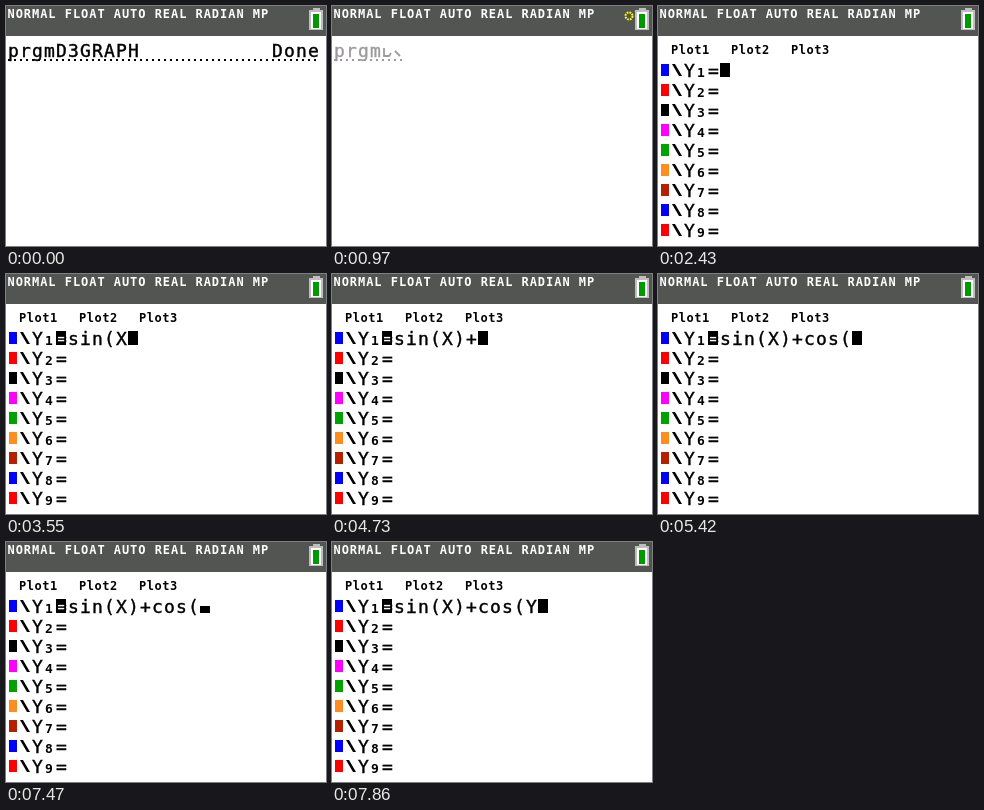
An HTML page that plays this animation: 320 px wide and 240 px high, repeating every 8000 ms.

```html
<!DOCTYPE html>
<html lang="en">
<head>
<meta charset="utf-8">
<title>Entering a function</title>
<style>
  html, body { margin: 0; width: 100%; height: 100%; overflow: hidden; background: #fff; }
  svg { display: block; width: 320px; height: 240px; color: #000; }
  text { font-family: "DejaVu Sans Mono", monospace; fill: currentColor; }
  .big { font-size: 18px; letter-spacing: 1.163px; stroke: currentColor; stroke-width: .4px; }
  .small { font-size: 12px; font-weight: bold; letter-spacing: .95px; }
  .plot { letter-spacing: .5px; }
  .index { font-size: 13px; }
</style>
</head>
<body>
<svg viewBox="0 0 320 240" xmlns="http://www.w3.org/2000/svg">
  <rect width="320" height="240" fill="#fff"/>
  <rect width="320" height="30" fill="#525552"/>
  <text class="small" x="1.5" y="11.5" color="#fff">NORMAL FLOAT AUTO REAL RADIAN MP</text>
  <circle id="busy" cx="297" cy="10" r="3.5" fill="none" stroke="#ffff00" stroke-width="2" stroke-dasharray="1.75 1"/>
  <path d="M307 2h7v2h3v20h-14v-20h4z" fill="#bdbebd"/>
  <rect x="305" y="6" width="10" height="17" fill="#fff"/>
  <rect x="307" y="8" width="6" height="14" fill="#009a00"/>
  <g id="home">
    <text class="big" id="entry" x="2" y="51"></text>
    <text class="big" id="answer" x="266" y="51">Done</text>
    <path id="partial" d="M52 42V50H57L59 47M63 45L68 50" fill="none" stroke="currentColor" stroke-width="1.8"/>
    <line id="dots" x1="2" y1="54" y2="54" stroke="currentColor" stroke-width="2" stroke-dasharray="2 4"/>
  </g>
  <g id="editor">
    <g id="plots"></g>
    <g id="rows"></g>
    <g id="equal">
      <rect x="50" y="57" width="10" height="14"/>
      <text class="small" x="51.4" y="68.5" color="#fff">=</text>
    </g>
    <text class="big" id="formula" x="62" y="71"></text>
  </g>
  <rect id="cursor" width="10" height="14"/>
  <text class="big" id="alpha" y="71" color="#fff">A</text>
</svg>
<script>
const LOOP = 8000;
const el = id => document.getElementById(id);
const show = (id, on) => el(id).setAttribute("display", on ? "inline" : "none");
const colX = col => 2 + 12 * col;

function add(parent, tag, attrs, text = "") {
  const node = document.createElementNS("http://www.w3.org/2000/svg", tag);
  for (const key in attrs) node.setAttribute(key, attrs[key]);
  node.textContent = text;
  parent.appendChild(node);
  return node;
}

[1, 2, 3].forEach(n =>
  add(el("plots"), "text", { class: "small plot", x: 60 * n - 47, y: 47.5 }, "Plot" + n));

const colors = ["#0000ff", "#ff0000", "#000", "#ff00ff", "#00a200", "#ff8e21", "#b52000", "#0000ff", "#ff0000"];
const rows = colors.map((color, i) => {
  const g = add(el("rows"), "g", { transform: `translate(0 ${57 + 20 * i})` });
  add(g, "rect", { x: 3, y: 1, width: 8, height: 12, fill: color });
  add(g, "path", { d: "M14 1h3l7 12h-3z" });
  add(g, "text", { class: "big", x: 26, y: 14 }, "Y");
  add(g, "text", { class: "small index", x: 39, y: 14 }, i + 1);
  add(g, "text", { class: "big", x: 50, y: 14 }, "=");
  return g;
});

// Each track lists [start time, value]
const at = (track, t) => track.reduce((value, [start, next]) => t >= start ? next : value, track[0][1]);

const typed = [
  [0, ""], [3030, "sin"], [3070, "sin("], [3510, "sin(X"], [4100, "sin(X)"],
  [4730, "sin(X)+"], [5370, "sin(X)+co"], [5420, "sin(X)+cos("], [7820, "sin(X)+cos(Y"]
];
const rowCount = [[0, 0], [1050, 3], [1090, 9]];
const screen = [[0, "full"], [930, "clear"], [970, "partial"], [1010, "dim"], [1050, "gone"]];
const cursorHeight = [
  [0, 0], [140, 14], [480, 0], [780, 14], [930, 0], [1160, 14], [1450, 0], [1790, 14],
  [2090, 7], [2140, 0], [2430, 14], [2770, 0], [3070, 14], [3360, 0], [3550, 14],
  [3850, 0], [4140, 14], [4440, 0], [4730, 14], [5080, 0], [5420, 14], [5710, 0],
  [6060, 14], [6160, 0], [6200, 14], [6490, 0], [6840, 14], [7180, 0], [7470, 7],
  [7520, 14], [7820, 0], [7860, 14]
];
const busy = [[0, false], [930, true], [1160, false], [3510, true], [3550, false],
  [5370, true], [5420, false], [7820, true], [7860, false]];

function drawHome(state) {
  const partial = state === "partial";
  show("home", state !== "clear" && state !== "gone");
  show("partial", partial);
  show("answer", !partial);
  el("home").setAttribute("color", state === "full" ? "#000" : "#9c9a9c");
  el("entry").textContent = partial ? "prgm" : "prgmD3GRAPH";
  el("dots").setAttribute("x2", partial ? 72 : 314);
}

function draw(t) {
  const text = at(typed, t);
  const count = at(rowCount, t);
  const height = at(cursorHeight, t);
  const x = colX(count ? 5 + text.length : 0);

  drawHome(at(screen, t));
  show("editor", count);
  rows.forEach((row, i) => row.setAttribute("display", i < count ? "inline" : "none"));
  show("equal", text);
  el("formula").textContent = text;

  show("cursor", height);
  el("cursor").setAttribute("x", x);
  el("cursor").setAttribute("y", 71 - height);
  el("cursor").setAttribute("height", height);
  show("alpha", height === 14 && t >= 6200 && t < 7820);
  el("alpha").setAttribute("x", x);

  show("busy", at(busy, t));
}

function tick(now) {
  draw(now % LOOP);
  requestAnimationFrame(tick);
}
draw(0);
requestAnimationFrame(tick);
</script>
</body>
</html>
```
